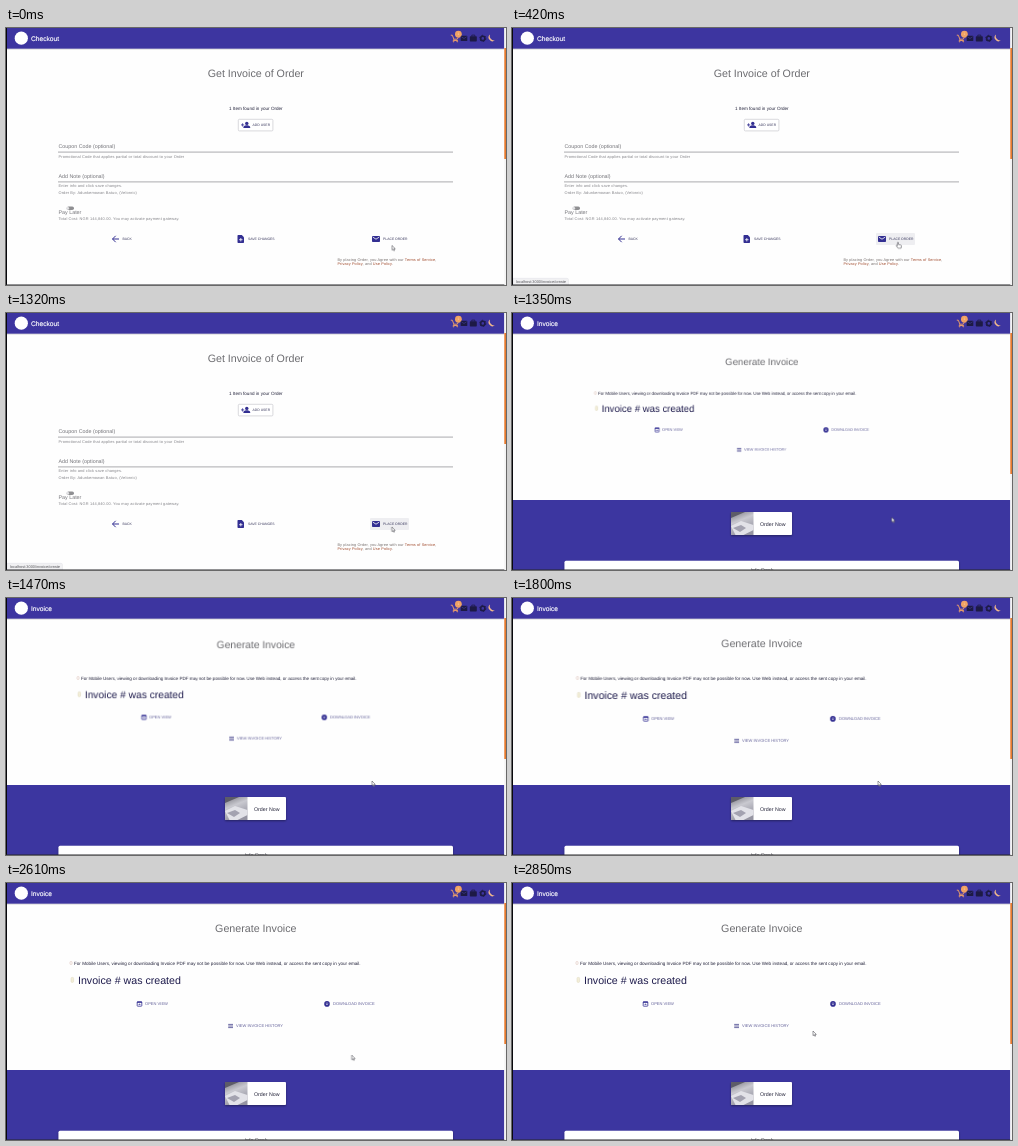
Animation, 500 px wide and 257 px high, one loop 2.88 s. Source, as an HTML page:

```html
<!DOCTYPE html>
<html lang="en">
<head>
<meta charset="utf-8">
<title>Checkout</title>
<style>
  html, body { margin: 0; width: 100%; height: 100%; overflow: hidden; background: #fefefe; }
  svg { display: block; width: 500px; height: 257px; font-family: "Liberation Sans", Arial, sans-serif; }
  text { text-rendering: geometricPrecision; white-space: pre; }

  .bar { fill: #3c36a0; }
  .ink { fill: #332f92; }
  .dark { fill: #1d1a45; }
  .title { font-size: 10.7px; fill: #6c6c70; text-anchor: middle; }
  .brand { font-size: 6.65px; fill: #fff; stroke: #fff; stroke-width: .15; }
  .body { font-size: 4.6px; fill: #24243c; }
  .label { font-size: 5.35px; fill: #75757a; }
  .hint { font-size: 3.92px; letter-spacing: .13px; fill: #85858a; }
  .legal { font-size: 3.85px; letter-spacing: .11px; fill: #77706e; }
  .link { fill: #a04a2c; }
  .btn { font-size: 3.42px; fill: #38375c; }
  .action { font-size: 4.05px; fill: #64629a; }
  .rule { stroke: #a2a2a5; stroke-width: .9; }

  .checkout, .invoice, .hover, .hand, .arrow, .cursor, .grow {
    animation: 2880ms linear infinite;
  }
  .checkout { animation-name: leave; animation-timing-function: step-end; }
  .invoice { animation-name: enter; animation-timing-function: step-end; }
  .hover { animation-name: hover; }
  .hand { animation-name: hand; animation-timing-function: step-end; }
  .arrow { animation-name: arrow; animation-timing-function: step-end; }
  .cursor { animation-name: move; }
  .grow { animation-name: grow; transform-origin: 250px 80px; }

  /* the page changes at 1350 ms = 46.87% */
  @keyframes leave { 0% { opacity: 1 } 46.87%, 100% { opacity: 0 } }
  @keyframes enter { 0% { opacity: 0 } 46.87%, 100% { opacity: 1 } }
  @keyframes hover { 0%, 2% { opacity: 0 } 9%, 100% { opacity: 1 } }
  @keyframes hand { 0% { opacity: 0 } 3.1% { opacity: 1 } 40.6%, 100% { opacity: 0 } }
  @keyframes arrow { 0% { opacity: 1 } 3.1% { opacity: 0 } 40.6%, 100% { opacity: 1 } }
  @keyframes move {
    0%, 1% { transform: translate(386px, 217.4px); animation-timing-function: ease-out }
    14.5%, 45.84% { transform: translate(386px, 214.2px); animation-timing-function: ease-out }
    51.04%, 85.42% { transform: translate(366px, 183px); animation-timing-function: ease-in-out }
    98.95%, 100% { transform: translate(301px, 148px) }
  }
  @keyframes grow {
    0%, 46.87% { transform: scale(.9); animation-timing-function: cubic-bezier(.16, 1, .3, 1) }
    77.1%, 100% { transform: none }
  }
</style>
</head>
<body>
<svg viewBox="0 0 500 257">
  <defs>
    <filter id="shadow" x="-20%" y="-40%" width="140%" height="200%">
      <feDropShadow dx="0" dy="1" stdDeviation="1.1" flood-opacity=".4"/>
    </filter>
    <filter id="soft" x="0" y="0" width="100%" height="130%">
      <feDropShadow dx="0" dy=".5" stdDeviation=".7" flood-opacity=".3"/>
    </filter>
    <linearGradient id="photo" x2="0.4" y2="1">
      <stop offset="0" stop-color="#77767f"/>
      <stop offset=".45" stop-color="#c9c9d0"/>
      <stop offset="1" stop-color="#9695a2"/>
    </linearGradient>
    <g id="mail">
      <rect width="8" height="6" rx=".8"/>
      <path d="M.8 1.1 4 3.2 7.2 1.1" fill="none" stroke="#fff" stroke-width=".8"/>
    </g>
  </defs>

  <rect width="500" height="257" fill="#fefefe"/>

  <g class="checkout">
    <text class="title" x="249.8" y="49">Get Invoice of Order</text>
    <text class="body" x="223" y="82.3">1 Item found in your Order</text>

    <rect x="232.3" y="91.3" width="34.6" height="11.6" rx="1" fill="#fff" stroke="#c9c9ce" stroke-width=".7"/>
    <g class="ink">
      <circle cx="240.8" cy="95.4" r="1.7"/>
      <path d="M237.4 100v-.8c0-1.6 2.3-2 3.4-2s3.4.4 3.4 2v.8z"/>
      <path d="M235 96.9h3.2M236.6 95.3v3.2" stroke="#332f92" stroke-width=".8"/>
    </g>
    <text class="btn" x="246.5" y="98.3">ADD USER</text>

    <text class="label" x="52.5" y="120.3">Coupon Code (optional)</text>
    <path class="rule" d="M52 124.1H447"/>
    <text class="hint" x="52.5" y="129.8">Promotional Code that applies partial or total discount to your Order</text>

    <text class="label" x="52.5" y="150.3">Add Note (optional)</text>
    <path class="rule" d="M52 153.9H447"/>
    <text class="hint" x="52.5" y="159.4">Enter info and click save changes.</text>
    <text class="hint" x="52.5" y="165.8">Order By: Adunkemowan Batuo, (Velonric)</text>

    <text class="label" x="52.5" y="186.3">Pay Later</text>
    <rect x="60.8" y="178.5" width="7.2" height="3.5" rx="1.75" fill="#8f8f92"/>
    <circle cx="61.6" cy="180.2" r="1.5" fill="#e2e2e4"/>
    <text class="hint" x="52.5" y="192.1">Total Cost: NGR 144,840.00. You may activate payment gateway.</text>

    <path d="M113 211H106.5M109.7 207.8 106.5 211 109.7 214.2" fill="none" stroke="#332f92" stroke-width="1"/>
    <text class="btn" x="116.5" y="212.2">BACK</text>

    <path class="ink" d="M232.2 207h3.6l2.2 2.2v5.1q0 .7-.7.7h-5.1q-.7 0-.7-.7v-6.6q0-.7.7-.7z"/>
    <path d="M234.8 210v3.4M233.1 211.7h3.4" stroke="#fff" stroke-width=".8"/>
    <text class="btn" x="242" y="212.2">SAVE CHANGES</text>

    <rect class="hover" x="364" y="205" width="39" height="12" rx="1" fill="#eeeef1"/>
    <use href="#mail" class="ink" x="366" y="208"/>
    <text class="btn" x="377" y="212.2">PLACE ORDER</text>

    <text class="legal" x="331.4" y="233.2">By placing Order, you Agree with our <tspan class="link">Terms of Service</tspan>,</text>
    <text class="legal" x="331.4" y="237.2"><tspan class="link">Privacy Policy</tspan>, and <tspan class="link">Use Policy</tspan>.</text>

    <g class="hover">
      <path d="M1 250.3H55q1.5 0 1.5 1.5V257H1z" fill="#f1f1f3" stroke="#dcdce0" stroke-width=".4"/>
      <text x="4" y="255" font-size="3.88" fill="#55555a">localhost:3000/invoice/create</text>
    </g>
  </g>

  <g class="invoice">
    <g class="grow">
      <text class="title" x="249.8" y="49.3">Generate Invoice</text>
      <rect x="64" y="78.6" width="2" height="2.8" rx=".5" fill="none" stroke="#d9b9ae" stroke-width=".5"/>
      <text class="body" x="68" y="81.8">For Mobile Users, viewing or downloading Invoice PDF may not be possible for now. Use Web instead, or access the sent copy in your email.</text>
      <rect x="65" y="94.4" width="2.6" height="5" rx="1" fill="#f3eed8" stroke="#ddd6bd" stroke-width=".5"/>
      <text x="72" y="100.6" font-size="10.65" fill="#1e1b4c">Invoice # was created</text>

      <rect x="131.2" y="118.8" width="4.6" height="4.4" rx=".5" fill="none" stroke="#332f92" stroke-width=".8"/>
      <path d="M131 119.2h5" stroke="#332f92" stroke-width="1.2"/>
      <path class="ink" d="M133.5 120.4l1.3 1.4h-2.6z"/>
      <text class="action" x="139" y="122.3">OPEN VIEW</text>

      <circle class="ink" cx="321" cy="120.9" r="2.8"/>
      <path d="M321 119.3v2.2M319.9 120.8l1.1 1.1 1.1-1.1" fill="none" stroke="#fff" stroke-width=".5"/>
      <text class="action" x="327" y="122.3">DOWNLOAD INVOICE</text>

      <path d="M222.2 141.4h4.8M222.2 143h4.8M222.2 144.6h4.8" stroke="#4a478f" stroke-width=".8"/>
      <text class="action" x="230" y="144.3">VIEW INVOICE HISTORY</text>
    </g>

    <rect class="bar" y="187" width="498.3" height="70"/>
    <rect x="219" y="199" width="61" height="23" rx="1" fill="#fff" filter="url(#shadow)"/>
    <rect x="219" y="199" width="22.5" height="23" fill="url(#photo)"/>
    <path d="M219 199h14l-14 6z" fill="#5d5c68"/>
    <path d="M219 213l10-5 12.5 4v5l-10 5h-8z" fill="#e2e2e8"/>
    <path d="M221 215l8-3 5 3-6 4z" fill="#a3a2b0"/>
    <text x="248" y="212.7" font-size="5.28" fill="#24243a">Order Now</text>
    <rect x="52.5" y="247.7" width="394.5" height="14" rx="1.5" fill="#fff" filter="url(#shadow)"/>
    <text x="250" y="259.3" font-size="5.4" fill="#55555c" text-anchor="middle">Info Desk</text>
  </g>

  <g>
    <rect class="bar" width="498.3" height="20.6" filter="url(#soft)"/>
    <circle cx="15.3" cy="10.2" r="6.6" fill="#fff"/>
    <text class="brand checkout" x="25" y="12.8">Checkout</text>
    <text class="brand invoice" x="25" y="12.8">Invoice</text>

    <g fill="none" stroke="#e59a6a" stroke-width="1">
      <path d="M444.8 7.2h1.5l1.6 4h3.4l1.3-2.6M447.9 11.2l-.7 1.3h4.6"/>
      <circle cx="447.6" cy="13.6" r=".4"/>
      <circle cx="451.2" cy="13.6" r=".4"/>
    </g>
    <circle cx="452.4" cy="6.2" r="3.4" fill="#f0a264"/>
    <text x="452.4" y="7.4" font-size="3.4" fill="#f8d3b4" text-anchor="middle">1</text>
    <g class="dark">
      <rect x="454.7" y="7.8" width="6.6" height="5.2" rx=".6"/>
      <rect x="463.8" y="8.2" width="7" height="5.2" rx=".7"/>
      <path d="M465.8 8.4v-1.3h3v1.3" fill="none" stroke="#1d1a45" stroke-width=".8"/>
    </g>
    <path d="M455.3 8.7l2.7 1.8 2.7-1.8" fill="none" stroke="#4b46a5" stroke-width=".5"/>
    <circle cx="476.8" cy="10.4" r="2.1" fill="none" stroke="#1d1a45" stroke-width="1.6"/>
    <circle cx="476.8" cy="10.4" r="3.1" fill="none" stroke="#1d1a45" stroke-width="1" stroke-dasharray="1.62"/>
    <path d="M484 6.4a3.8 3.8 0 1 0 5 5.9a4.4 4.4 0 0 1-5-5.9z" fill="#f3b98a"/>
  </g>

  <rect width="1" height="257" fill="#08080c"/>
  <rect y="256.5" width="500" height=".5" fill="#26262b"/>
  <rect x="498.3" width="1.7" height="257" fill="#f4f4f4"/>
  <rect class="checkout" x="498.3" y="20" width="1.7" height="111" fill="#e87a2c"/>
  <rect class="invoice" x="498.3" y="20" width="1.7" height="141" fill="#e87a2c"/>

  <g class="cursor" fill="#fff" stroke="#3a3a42" stroke-width=".5" stroke-linejoin="round">
    <path class="arrow" d="M0 0v4.7l1.1-1 .8 1.7.7-.4-.7-1.6h1.4z"/>
    <path class="hand" d="M-.6.3q.6-.7 1.1 0v2l2.4.6q.7.2.6 1l-.4 2.1h-3l-2.1-2.6q.3-.7 1.4.2z"/>
  </g>
</svg>
</body>
</html>
```
